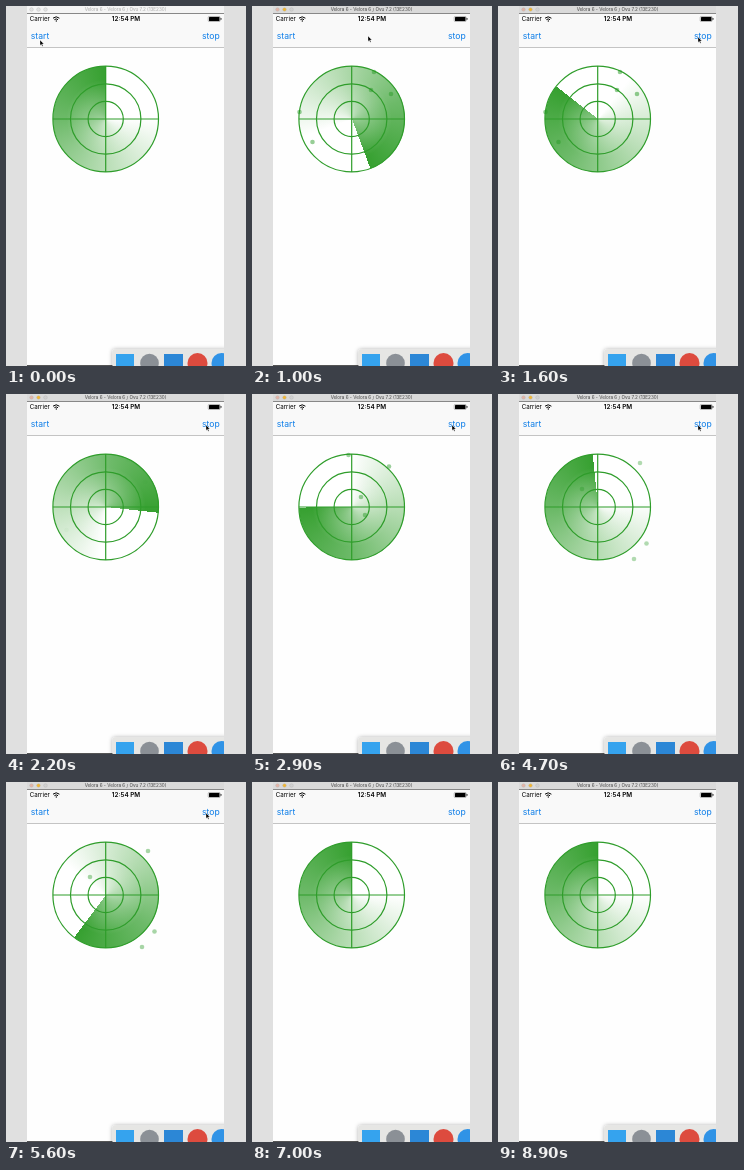
Write an HTML page that moves like this. It is 240x360 px and loops after 9000 ms.

```html
<!DOCTYPE html>
<html lang="en">
<head>
<meta charset="utf-8">
<style>
  html, body { margin: 0; width: 100%; height: 100%; overflow: hidden; background: #e0e0e0; }
  #stage { position: relative; width: 240px; height: 360px; overflow: hidden; }
  #app { position: absolute; left: 21px; top: 0; width: 197px; height: 360px; background: #fefefe; }
  #sweep {
    position: absolute; left: 47px; top: 60px; width: 106px; height: 106px; border-radius: 50%;
    background:
      radial-gradient(closest-side, rgb(255 255 255 / .4), rgb(255 255 255 / 0) 75%),
      conic-gradient(from var(--edge, 0deg), #fff 25%, #b9deb6 50%, #6dba69 75%, #36a030);
  }
  svg { position: absolute; left: 0; top: 0; }
  text { font-family: Inter, "Liberation Sans", sans-serif; }
</style>
</head>
<body>
<div id="stage">
  <div id="app"></div>
  <div id="sweep"></div>
  <svg width="240" height="360" viewBox="0 0 240 360">
    <defs>
      <clipPath id="window"><rect x="21" width="197" height="360"/></clipPath>
      <filter id="shadow" x="-20%" y="-60%" width="140%" height="220%">
        <feDropShadow dx="0" dy="0" stdDeviation="2" flood-opacity=".35"/>
      </filter>
    </defs>

    <rect id="bar" x="21" width="197" height="7"/>
    <g id="lights" stroke="#b5b5b5" stroke-width=".4">
      <circle cx="25.5" cy="3.5" r="1.8"/>
      <circle cx="32.5" cy="3.5" r="1.8"/>
      <circle cx="39.5" cy="3.5" r="1.8"/>
    </g>
    <text id="title" x="119.5" y="5.3" font-size="4.6" text-anchor="middle">Velora 6 - Velora 6 / Ovu 7.2 (13E230)</text>

    <rect x="21" y="7" width="197" height="34" fill="#f9f9f9"/>
    <path d="M21 7.5H218" stroke="#888"/>
    <path d="M21 41.5H218" stroke="#c4c4c4"/>
    <text x="23.7" y="15.3" font-size="6.2">Carrier</text>
    <g fill="none" stroke="#000" stroke-width="1">
      <path d="M47 12.2Q50.2 9.4 53.4 12.2M48.4 13.7Q50.2 12.1 52 13.7"/>
      <circle cx="50.2" cy="15" r=".3"/>
    </g>
    <text x="120" y="15.3" font-size="6.35" font-weight="600" text-anchor="middle">12:54 PM</text>
    <rect x="202.2" y="10.5" width="12" height="5" rx="1" fill="none" stroke="#777" stroke-width=".5"/>
    <rect x="203" y="11" width="10.5" height="4" rx=".5"/>
    <rect x="214.6" y="12" width=".8" height="2" rx=".4"/>
    <g font-size="8.6" fill="#0a7ce8">
      <text x="24.8" y="33">start</text>
      <text x="196" y="33">stop</text>
    </g>

    <g fill="none" stroke="#2f9d2b" stroke-width="1.2">
      <circle cx="99.7" cy="113" r="52.8"/>
      <circle cx="99.7" cy="113" r="35.2"/>
      <circle cx="99.7" cy="113" r="17.6"/>
      <path d="M47 113H152.5M99.7 60V166"/>
    </g>
    <g id="blips" fill="#2a9a28"></g>

    <path d="M21 359.5H107" stroke="#555"/>
    <g clip-path="url(#window)">
      <rect x="106.5" y="343.5" width="140" height="30" rx="2" fill="#e6e6e4" filter="url(#shadow)"/>
      <rect x="110" y="348" width="18" height="18" fill="#35a3ee"/>
      <circle cx="143.5" cy="357" r="9.3" fill="#8b9096"/>
      <rect x="158" y="348" width="19" height="18" fill="#2c87d6"/>
      <circle cx="191.5" cy="357" r="10" fill="#dd4b3e"/>
      <circle cx="215.5" cy="357" r="10" fill="#3093e6"/>
    </g>
    <path id="cursor" d="M0 0V5.4L1.3 4.3L2.2 6.3L3.1 5.9L2.2 3.9H3.9Z" stroke="#fff" stroke-width=".35"/>
  </svg>
</div>
<script>
const LOOP = 9000, STEP = 100;
const START = 354, STOP = 5700;
const SPEED = 0.2472; // degrees per ms
const PULSE = 1930;   // life of one set of blips
const blipSets = [
  [[122, 66], [139, 88], [119, 84], [47.5, 106], [60.5, 136]],
  [[96.5, 61], [137, 72.5], [109, 103], [113, 121]],
  [[142, 69], [148.5, 149.5], [136, 165], [84, 95]]
];
const cursorPath = [ // time, x, y
  [0, 34, 34], [450, 34, 34], [1000, 116, 30], [1500, 200, 31],
  [5800, 200, 31], [6300, 200, -10], [LOOP, 200, -10]
];
const $ = id => document.getElementById(id);

function cursorAt(t) {
  const i = cursorPath.findIndex(p => p[0] > t);
  const [t0, x0, y0] = cursorPath[i - 1], [t1, x1, y1] = cursorPath[i];
  const k = (t - t0) / (t1 - t0);
  return [x0 + (x1 - x0) * k, y0 + (y1 - y0) * k];
}

function drawWindow(active) {
  $("bar").setAttribute("fill", active ? "#dadada" : "#f4f4f4");
  $("title").setAttribute("fill", active ? "#444" : "#aaa");
  const colors = active ? ["#e3b3a6", "#f2b632", "#d0d0d0"] : ["#e2e2e2", "#e2e2e2", "#e2e2e2"];
  [...$("lights").children].forEach((c, i) => c.setAttribute("fill", colors[i]));
}

function drawRadar(t) {
  const running = t >= START && t < STOP;
  const age = running ? t - START : 0;
  $("sweep").style.setProperty("--edge", age * SPEED % 360 + "deg");
  const set = running ? blipSets[Math.floor(age / PULSE)] : [];
  $("blips").innerHTML = set.map(([x, y]) => `<circle cx="${x}" cy="${y}" r="2.3"/>`).join("");
  $("blips").setAttribute("fill-opacity", 0.6 * Math.sin(Math.PI * (age % PULSE) / PULSE) ** 1.5);
}

function frame(now) {
  const t = Math.floor(now % LOOP / STEP) * STEP;
  drawWindow(t >= START);
  drawRadar(t);
  $("cursor").setAttribute("transform", `translate(${cursorAt(t)})`);
  requestAnimationFrame(frame);
}
frame(0);
</script>
</body>
</html>
```
